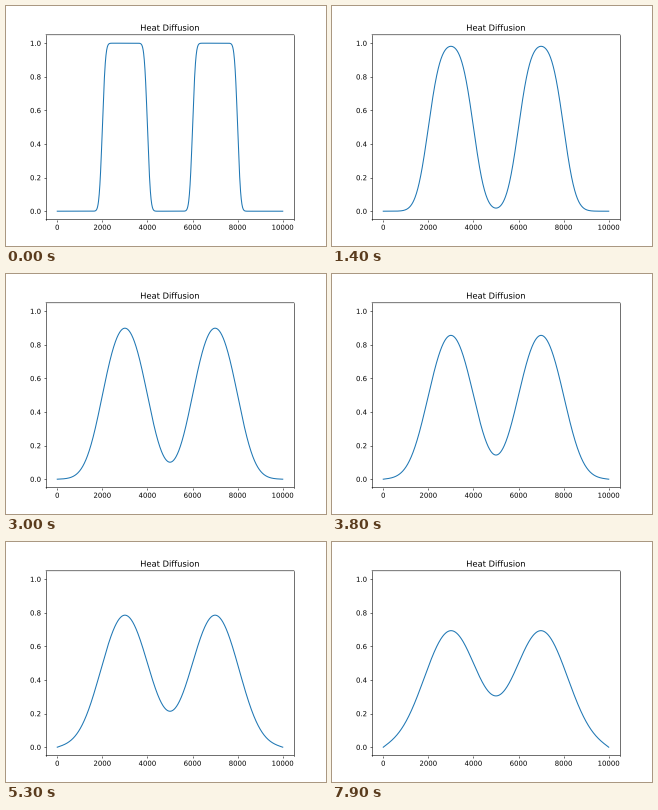
Recreate the animation shown at these times as a matplotlib script. Size 320x240 px, loop 8000 ms.

```python
import matplotlib.pyplot as plt
import numpy as np
from matplotlib import patheffects
from matplotlib.animation import FuncAnimation

FRAMES = 80
INTERVAL = 100
LENGTH = 10000
VARIANCE_STEP = 12000  # growth of the heat kernel's variance per frame
HOT_ZONES = [(2000, 4000), (6000, 8000)]

# Sine series of the hot zones, with both rod ends held at zero.
x = np.linspace(0, LENGTH, 1001)
wave = np.arange(1, 221) * np.pi / LENGTH
coeffs = sum(np.cos(wave * a) - np.cos(wave * b) for a, b in HOT_ZONES)
coeffs *= 2 / (wave * LENGTH)
modes = np.sin(np.outer(x, wave))


def temperature(frame):
    variance = VARIANCE_STEP * (frame + 1)
    return modes @ (coeffs * np.exp(-wave**2 * variance / 2))


plt.rcParams["text.hinting"] = "none"
fig, ax = plt.subplots(figsize=(6.4, 4.8), dpi=50)
title = ax.set_title("Heat Diffusion")
ax.set_xlim(-0.05 * LENGTH, 1.05 * LENGTH)
ax.set_ylim(-0.05, 1.05)
line, = ax.plot(x, temperature(0))

# Draw text as outlines and the horizontal borders at subpixel positions.
for text in [title, *ax.get_xticklabels(), *ax.get_yticklabels()]:
    text.set_path_effects([patheffects.Normal()])
for side in ("top", "bottom"):
    ax.spines[side].set_snap(False)


def update(frame):
    line.set_ydata(temperature(frame))
    return line,


anim = FuncAnimation(fig, update, frames=FRAMES, interval=INTERVAL,
                     repeat=True, repeat_delay=0)
plt.show()
```
